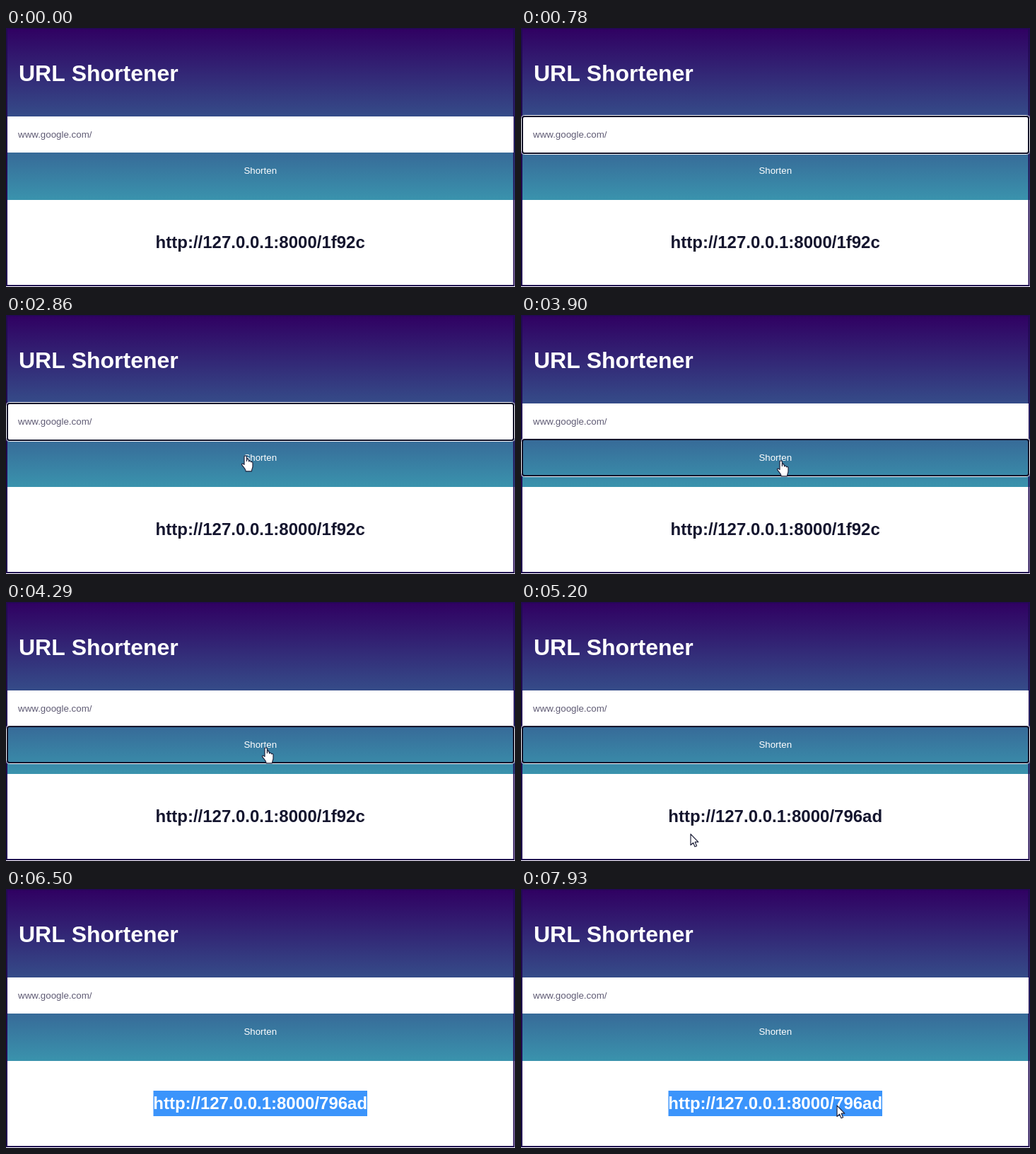
These frames come from a looping animation (720x366 px, 8 s). An HTML page with a canvas:

```html
<!DOCTYPE html>
<html lang="en">
<head>
<meta charset="utf-8">
<title>URL Shortener</title>
<style>
  html, body { margin: 0; width: 100%; height: 100%; overflow: hidden; background: #fff; }
  canvas { display: block; }
</style>
</head>
<body>
<canvas id="stage" width="720" height="366"></canvas>
<script>
const ctx = document.getElementById('stage').getContext('2d');
const LOOP = 8000, STEP = 130;
const SANS = '"Liberation Sans", Arial, sans-serif';
const SMALL = '13.333px ' + SANS;
const BIG = 'bold 24px ' + SANS;
const HIGHLIGHT = '#3b94fb';

// Pointer track: time, x, y
const POINTER = [
  [0, 320, 303], [390, 320, 303], [650, 130, 150], [2470, 130, 150],
  [2600, 300, 172], [2860, 339, 199], [3250, 368, 206], [4940, 368, 206],
  [5070, 300, 275], [5200, 240, 328], [5460, 208, 305], [5720, 208, 305],
  [6500, 520, 305], [7800, 520, 305], [7930, 447, 306]
];
// Selected characters in the field (counted from its end) and in the result
const FIELD_SEL = [[780, 0], [1300, 15], [2079, 15], [2080, 0]];
const RESULT_SEL = [[5720, 0], [5980, 15], [6500, 27]];

const ARROW = new Path2D('M0 0V15.5L3.6 12.2L6 17.8L8.6 16.7L6.2 11.2H10.8Z');
const HAND = new Path2D('M-2 1.5C-2-.6 1.2-.6 1.4 1.5V7.5C2-.0 4.5 6.3 4.6 8' +
  'C5.4 6.6 7.4 7.2 7.6 8.8C8.6 7.8 10 8.6 10 10.2V15C10 17.4 8.6 18.4 8.4 21.8H.2' +
  'C.2 18.6-2.6 17-5.4 12.6C-6 11-4 10.2-2 12.4Z');

function track(keys, t, i = 1) {
  if (t <= keys[0][0]) return keys[0][i];
  for (let k = 1; k < keys.length; k++) {
    const a = keys[k - 1], b = keys[k];
    if (t < b[0]) return a[i] + (b[i] - a[i]) * (t - a[0]) / (b[0] - a[0]);
  }
  return keys[keys.length - 1][i];
}

function rect(x, y, w, h, color) {
  ctx.fillStyle = color;
  ctx.fillRect(x, y, w, h);
}

function text(str, x, y, font, color) {
  ctx.font = font;
  ctx.fillStyle = color;
  ctx.fillText(str, x, y);
}

function width(str, font) {
  ctx.font = font;
  return ctx.measureText(str).width;
}

// Text whose characters from..to are highlighted in a box of the given top and height
function selectable(str, x, y, font, color, from, to, top, height) {
  text(str, x, y, font, color);
  if (from >= to) return;
  const left = x + width(str.slice(0, from), font);
  const right = x + width(str.slice(0, to), font);
  ctx.save();
  ctx.beginPath();
  ctx.rect(left, top, right - left, height);
  ctx.clip();
  rect(left, top, right - left, height, HIGHLIGHT);
  text(str, x, y, font, '#fff');
  ctx.restore();
}

function outline(x, y, w, h, r, line, color) {
  ctx.beginPath();
  ctx.roundRect(x, y, w, h, r);
  ctx.lineWidth = line;
  ctx.strokeStyle = color;
  ctx.stroke();
}

function focusRing(y, h) {
  outline(0.5, y - 1.5, 719, h + 3, 4, 1, '#f4f4f8');
  outline(2, y, 716, h, 3, 2, '#14142a');
}

function pointer(shape, x, y) {
  ctx.save();
  ctx.translate(x, y);
  ctx.lineWidth = 1.2;
  ctx.lineJoin = 'round';
  ctx.strokeStyle = '#20233c';
  ctx.fillStyle = '#fff';
  ctx.fill(shape);
  ctx.stroke(shape);
  ctx.restore();
}

function drawPointer(t, selectedEnd) {
  const x = track(POINTER, t), y = track(POINTER, t, 2);
  const overField = y < 177, overResult = y > 285 && y < 321;
  const overSelection = t > 6500 && x < selectedEnd;
  if (overField || (overResult && !overSelection)) return;
  pointer(y < 243 ? HAND : ARROW, x, y);
}

function draw(t) {
  rect(0, 0, 720, 366, '#fff');
  const sky = ctx.createLinearGradient(0, 0, 0, 243);
  sky.addColorStop(0, '#300062');
  sky.addColorStop(1, '#3a93ad');
  rect(0, 0, 720, 243, sky);
  outline(1, 0.5, 717.5, 363.5, 0, 2, '#210a52');
  rect(2, 125, 716, 51, '#fff');

  text('URL Shortener', 18, 75, 'bold 32px ' + SANS, '#fff');

  const picked = Math.round(track(FIELD_SEL, t));
  selectable('www.google.com/', 17, 155, SMALL, '#5f5b74', 15 - picked, 15, 143, 15);
  text('Shorten', 336.4, 206, SMALL, '#fff');

  if (t >= 780 && t < 3900) focusRing(125, 52);
  if (t >= 3900 && t < 5720) focusRing(176, 51);

  const result = 'http://127.0.0.1:8000/' + (t < 4810 ? '1f92c' : '796ad');
  const w = width(result, BIG), x = 359.7 - w / 2;
  selectable(result, x, 311, BIG, '#14152e', 0, Math.round(track(RESULT_SEL, t)), 285, 36);

  drawPointer(t, x + w);
}

function frame(now) {
  const t = now % LOOP;
  draw(Math.floor(t / STEP) * STEP);
  requestAnimationFrame(frame);
}
requestAnimationFrame(frame);
</script>
</body>
</html>
```
